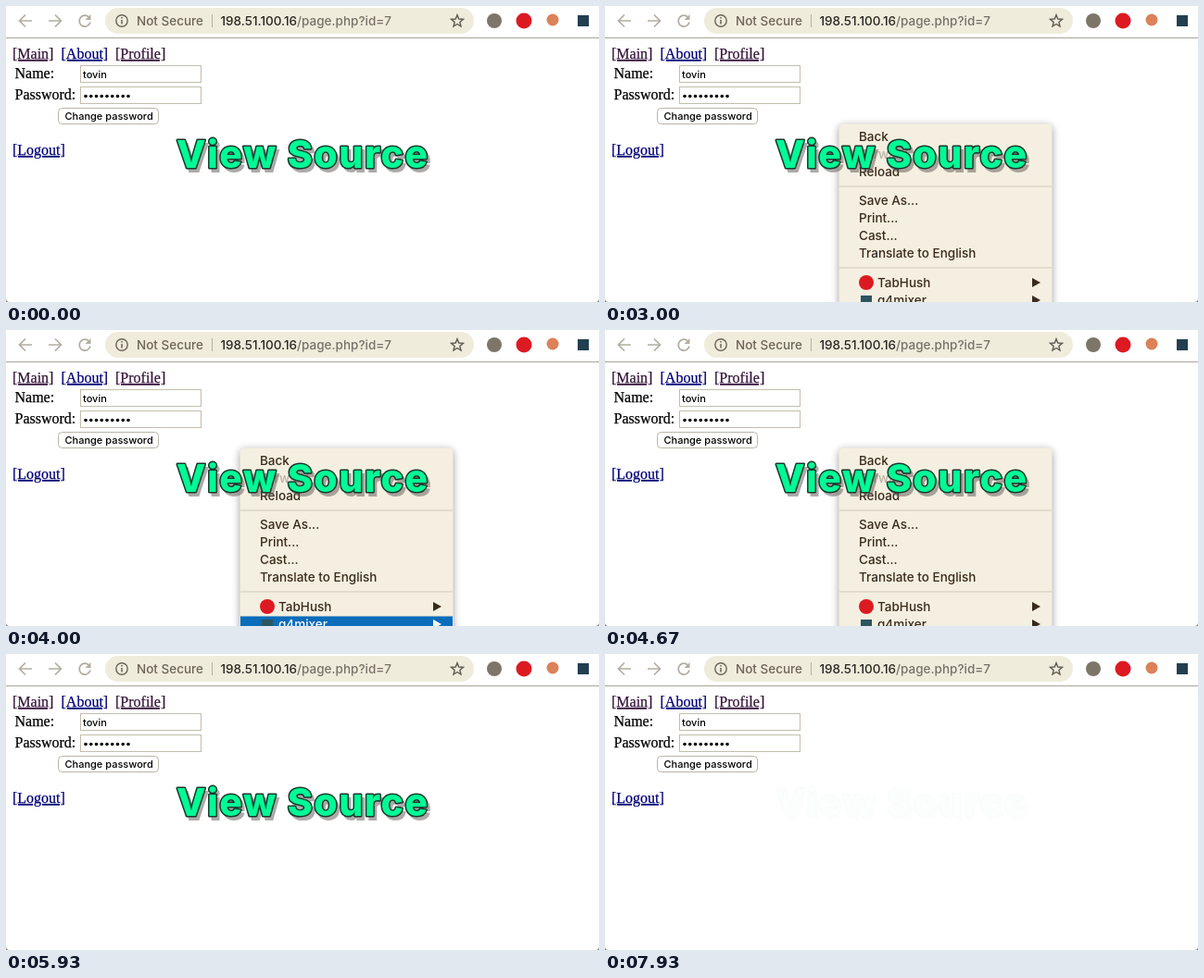
These frames come from a looping animation (640 px wide and 320 px high, 8 s). An HTML page:

```html
<!DOCTYPE html>
<html lang="en">
<head>
<meta charset="utf-8">
<title>View Source</title>
<style>
  html, body { margin: 0; width: 100%; height: 100%; overflow: hidden; background: #fff; }
  svg { display: block; width: 640px; height: 320px; }
  text { white-space: pre; }
  .ui { font: 500 13.5px Inter, Roboto, sans-serif; }
  .field { font: 500 11px Inter, Roboto, sans-serif; fill: #000; }
  .page { font-family: "Liberation Serif", serif; font-size: 16px; fill: #000; stroke: #000; stroke-width: .25; }
  .link { text-decoration: underline; fill: #000078; stroke: #000078; }
  .visited { fill: #35133a; stroke: #35133a; }
  .line { fill: none; stroke: #b3ada2; stroke-width: 1.7; }
  .title { font: 800 41px Inter, "Open Sans", sans-serif; letter-spacing: 1.6px; }
  .face { fill: #00fa96; stroke: #18382c; stroke-width: 3; stroke-linejoin: round; paint-order: stroke; }
  #menu, #highlight { opacity: 0; }
  #panel { filter: drop-shadow(0 2px 4px #0006); }
</style>
</head>
<body>
<svg viewBox="0 0 640 320" xmlns="http://www.w3.org/2000/svg">
  <rect width="640" height="320" fill="#fff"/>

  <g id="toolbar">
    <path d="M0 34.5H640" stroke="#aaa49b"/>
    <path class="line" d="M28 16H15M21 9.5L14.5 16L21 22.5M46 16H59M53 9.5L59.5 16L53 22.5"/>
    <path class="line" d="M89.5 12A6 6 0 1 0 91 17.5"/>
    <path d="M91.5 9V15H85.5Z" fill="#b3ada2"/>
    <rect x="107" y="2" width="398" height="28" rx="14" fill="#f0ecdc"/>
    <circle cx="125" cy="16" r="6.2" fill="none" stroke="#6b6459" stroke-width="1.4"/>
    <path d="M125 15V19.5M125 12V13.6" stroke="#6b6459" stroke-width="1.5"/>
    <text class="ui" x="141" y="21" fill="#6f6459">Not Secure</text>
    <path d="M222.5 9V23" stroke="#b5afa2"/>
    <text class="ui" x="231.5" y="21" fill="#2b2622">198.51.100.16<tspan fill="#777168">/page.php?id=7</tspan></text>
    <path id="star" fill="none" stroke="#5f5a52" stroke-width="1.4"/>
    <circle cx="527" cy="16" r="8" fill="#7d7568"/>
    <circle cx="559" cy="16" r="8.5" fill="#dd1a22"/>
    <circle cx="590" cy="15" r="6.5" fill="#dc8158"/>
    <rect x="617" y="10" width="12" height="12" fill="#223f50"/>
  </g>

  <g id="form">
    <text class="page link visited" x="7" y="57">[Main]</text>
    <text class="page link" x="59.5" y="57">[About]</text>
    <text class="page link visited" x="118" y="57">[Profile]</text>
    <text class="page" x="9.5" y="78">Name:</text>
    <text class="page" x="9.5" y="101">Password:</text>
    <g fill="#fff" stroke="#c4bdab">
      <rect x="80.5" y="64.5" width="130" height="18"/>
      <rect x="80.5" y="87.5" width="130" height="18"/>
      <rect x="56.5" y="110.5" width="108" height="17" rx="4" stroke="#bab5aa"/>
    </g>
    <text class="field" x="83" y="78">tovin</text>
    <g id="dots"></g>
    <text class="field" x="63.5" y="123">Change password</text>
    <text class="page link" x="7" y="161">[Logout]</text>
  </g>

  <g id="menu">
    <rect id="panel" x="252.5" y="127.5" width="230" height="210" rx="5" fill="#f4efe0"/>
    <path d="M253 195H482M253 283H482" stroke="#e2dccd" stroke-width="2"/>
    <g id="items"></g>
    <g id="highlight"><rect x="253" y="309.5" width="229" height="19" fill="#0a6cba"/></g>
  </g>

  <g id="title">
    <text class="title" x="187" y="178.5" fill="#5d5755" stroke="#5d5755" stroke-width="2" opacity=".5">View Source</text>
    <text class="title face" x="184" y="175">View Source</text>
  </g>

  <path d="M0 316V320H4Q0 320 0 316M640 316V320H636Q640 320 640 316" fill="#8a8a8a"/>
</svg>

<script>
const LOOP = 8000;
const $ = id => document.getElementById(id);

function add(parent, tag, attrs, text = "") {
  const node = document.createElementNS("http://www.w3.org/2000/svg", tag);
  for (const [key, value] of Object.entries(attrs)) node.setAttribute(key, value);
  node.textContent = text;
  parent.append(node);
  return node;
}

function addItem(parent, label, y, fill, icon) {
  add(parent, "text", { class: "ui", x: icon ? 294 : 274, y: y + 5, fill }, label);
  if (!icon) return;
  if (icon.round) add(parent, "circle", { cx: 282, cy: y, r: 8, fill: icon.color });
  else add(parent, "rect", { x: 276, y: y - 5, width: 12, height: 12, fill: icon.color });
  add(parent, "path", { d: `M461 ${y - 5}L470 ${y}L461 ${y + 5}Z`, fill });
}

const ink = "#3a2a1c";
const red = { color: "#dd1a22", round: true };
const slate = { color: "#2c5560" };
[
  ["Back", 141, ink], ["Forward", 160, "#b9b1a3"], ["Reload", 179, ink],
  ["Save As...", 210, ink], ["Print...", 229, ink], ["Cast...", 248, ink],
  ["Translate to English", 267, ink],
  ["TabHush", 299, ink, red], ["q4mixer", 318, ink, slate]
].forEach(item => addItem($("items"), ...item));
addItem($("highlight"), "q4mixer", 318, "#fff", slate);

for (let i = 0; i < 9; i++) add($("dots"), "circle", { cx: 86 + i * 5.75, cy: 97.5, r: 1.8 });

const starPoints = Array.from({ length: 10 }, (_, i) => {
  const angle = i * Math.PI / 5 - Math.PI / 2, r = i % 2 ? 3 : 6.8;
  return `${487 + r * Math.cos(angle)} ${16.5 + r * Math.sin(angle)}`;
});
$("star").setAttribute("d", `M${starPoints.join("L")}Z`);

// Each step is [time in ms, opacity]; paired times make hard cuts.
const opacitySteps = {
  menu: [[0, 0], [2200, 0], [2200, 1], [5330, 1], [5530, 0], [LOOP, 0]],
  highlight: [[0, 0], [3800, 0], [3800, 1], [4300, 1], [4300, 0], [LOOP, 0]],
  title: [[0, 1], [6530, 1], [7070, 0.015], [LOOP, 0.015]]
};
for (const [id, steps] of Object.entries(opacitySteps)) {
  const frames = steps.map(([time, opacity]) => ({ offset: time / LOOP, opacity }));
  $(id).animate(frames, { duration: LOOP, iterations: Infinity });
}
</script>
</body>
</html>
```
